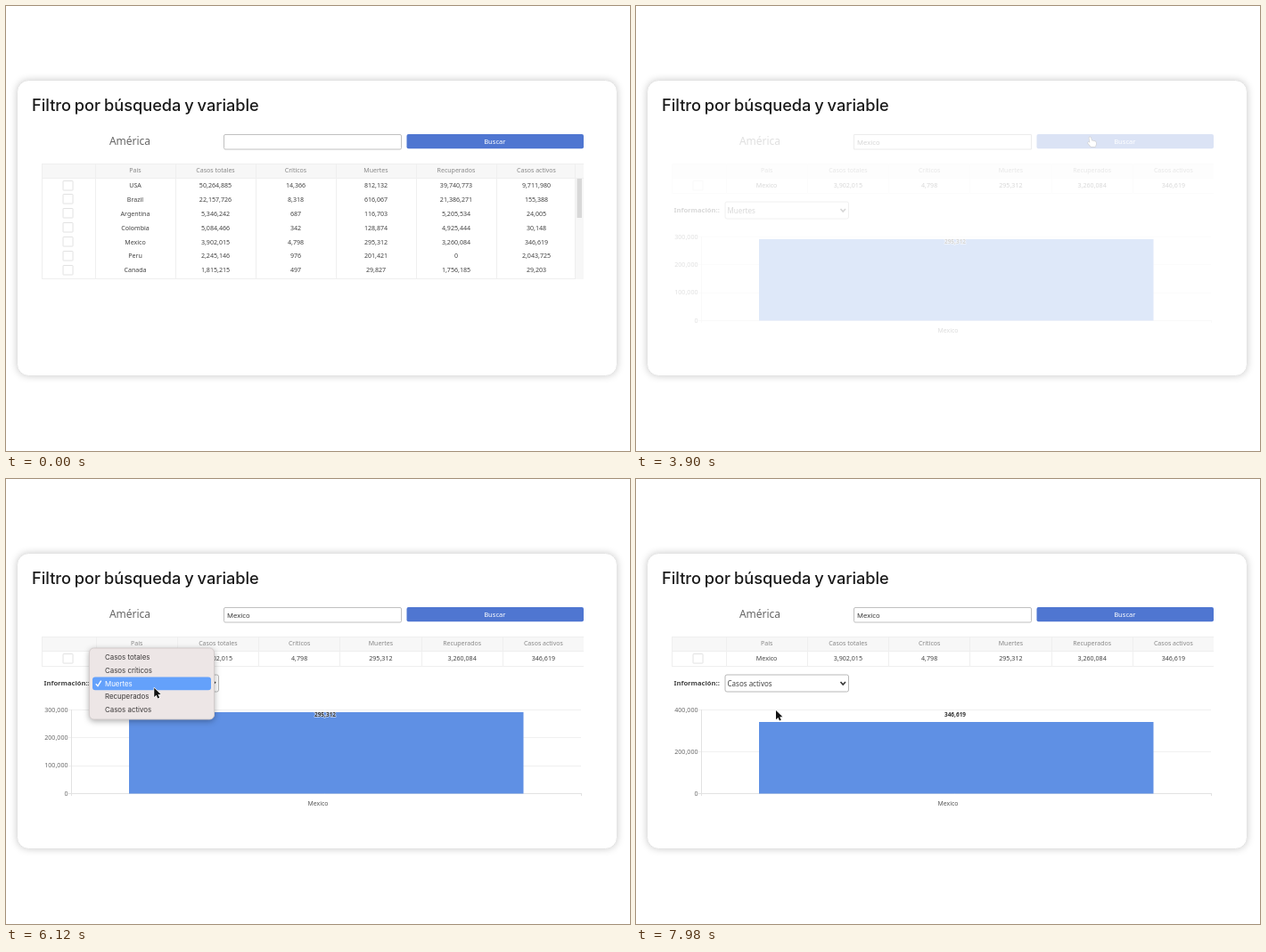
Animation of 700 by 500 pixels, one loop 8000 ms. Source, as an HTML page with a canvas:

```html
<!DOCTYPE html>
<html lang="es">
<head>
<meta charset="utf-8">
<title>Filtro por búsqueda y variable</title>
<style>
  html, body { margin: 0; width: 100%; height: 100%; overflow: hidden; background: #fff; }
  canvas { display: block; }
</style>
</head>
<body>
<canvas id="stage" width="700" height="500"></canvas>
<script>
const ctx = document.getElementById('stage').getContext('2d');
const LOOP = 8000;
const SWAP = 3840;        // table gives way to the search result
const MENU_OPEN = 6060;
const MENU_CLOSE = 7410;
const SANS = '"Noto Sans", sans-serif';
const UI = 'Inter, sans-serif';

const HEADERS = ['País', 'Casos totales', 'Críticos', 'Muertes', 'Recuperados', 'Casos activos'];
const COUNTRIES = `USA 50,264,885 14,366 812,132 39,740,773 9,711,980
Brazil 22,157,726 8,318 616,067 21,386,271 155,388
Argentina 5,346,242 687 116,703 5,205,534 24,005
Colombia 5,084,466 342 128,874 4,925,444 30,148
Mexico 3,902,015 4,798 295,312 3,260,084 346,619
Peru 2,245,146 976 201,421 0 2,043,725
Canada 1,815,215 497 29,827 1,756,185 29,203`.split('\n').map(row => row.split(' '));
const MEXICO = COUNTRIES.find(row => row[0] === 'Mexico');
const OPTIONS = ['Casos totales', 'Casos críticos', 'Muertes', 'Recuperados', 'Casos activos'];

const POINTER_START = { x: 632, y: 159 };
const MOVES = [
  { from: 30, to: 510, x: 289, y: 152 },
  { from: 2460, to: 2640, x: 325, y: 143 },
  { from: 2640, to: 3240, x: 511, y: 152 },
  { from: 4950, to: 5820, x: 167, y: 234 },
  { from: MENU_OPEN, to: 6690, x: 139, y: 265 },
  { from: 6930, to: 7170, x: 157, y: 260 }
];

const between = (v, a, b) => v >= a && v < b;
const clamp = v => Math.max(0, Math.min(1, v));
const progress = (t, a, b) => clamp((t - a) / (b - a));
const smooth = k => k * k * (3 - 2 * k);
const crisp = v => Math.floor(v) + 0.5;

function text(str, x, y, size, color, { align = 'center', weight = 500, family = SANS } = {}) {
  ctx.font = `${weight} ${size}px ${family}`;
  ctx.textAlign = align;
  ctx.fillStyle = color;
  ctx.fillText(str, x, y);
}

function box(x, y, w, h, r, fill, stroke) {
  ctx.beginPath();
  ctx.roundRect(x, y, w, h, r);
  ctx.fillStyle = fill;
  ctx.fill();
  if (!stroke) return;
  ctx.strokeStyle = stroke;
  ctx.lineWidth = 1;
  ctx.stroke();
}

function line(points, color, width = 1) {
  ctx.beginPath();
  points.forEach(([x, y]) => ctx.lineTo(x, y));
  ctx.strokeStyle = color;
  ctx.lineWidth = width;
  ctx.stroke();
}

function shadowBox(color, blur, offset, ...shape) {
  ctx.save();
  ctx.shadowColor = color;
  ctx.shadowBlur = blur;
  ctx.shadowOffsetY = offset;
  box(...shape);
  ctx.restore();
}

function drawCard() {
  ctx.fillStyle = '#fff';
  ctx.fillRect(0, 0, 700, 500);
  shadowBox('rgba(0,0,0,.22)', 8, 0, 12.5, 83.5, 673, 332, 13, '#fff');
  box(12.5, 83.5, 673, 332, 13, '#fff', '#e4e4e4');
  ctx.wordSpacing = '-1px';
  text('Filtro por búsqueda y variable', 29, 118, 18.2, '#1a1a1a', { align: 'left', family: UI });
  ctx.wordSpacing = '0px';
}

function caretVisible(t) {
  const phase = t < SWAP ? 960 : 320;
  return t < 1960 || (t - phase) % 1000 < 500;
}

function drawSearch(t) {
  text('América', 139, 156, 12, '#666');
  const focused = between(t, 690, MENU_OPEN);
  box(244.5, 144.5, 199, 16.5, focused ? 0 : 1.5, '#fff', focused ? '#a2a2a2' : '#c0c0c0');
  const typed = 'Mexico'.slice(0, Math.max(0, Math.floor((t - 1290) / 120)));
  text(typed, 248, 156, 7.7, '#333', { align: 'left' });
  if (focused && caretVisible(t)) {
    ctx.fillRect(248.3 + ctx.measureText(typed).width, 148, 0.9, 10);
  }
  box(449.5, 144, 198.5, 16.3, 2, '#4f76d1');
  text('Buscar', 548.3, 155, 7.6, '#fff');
}

// A narrow checkbox column, then one column per header.
function drawTable(rows, first, colWidth, bottom) {
  const rowHeight = 15.85;
  const edge = i => first + i * colWidth;
  const center = i => edge(i + 0.5);
  box(40, 177, 608, 16.5, 0, '#f7f7f7');
  for (const y of [177, 193, bottom]) line([[40, y + 0.5], [648, y + 0.5]], '#efefef');
  for (const x of [40, ...HEADERS.map((_, i) => edge(i))]) {
    line([[crisp(x), 177], [crisp(x), bottom]], '#efefef');
  }
  HEADERS.forEach((h, i) => text(h, center(i), 187.2, 7, '#888'));
  rows.forEach((row, r) => {
    const y = 201.5 + r * rowHeight;
    box(64, crisp(y - 5.5), 11, 10.5, 0.5, '#fff', '#e2e2e2');
    row.forEach((cell, i) => text(cell, center(i), y + 2.6, 7.1, '#444'));
  });
}

function drawFullTable() {
  drawTable(COUNTRIES, 100, 90, 306);
  box(639, 194, 9, 113, 0, '#f7f7f7');
  line([[638.5, 177], [638.5, 307]], '#efefef');
  box(640.5, 194, 5.5, 44, 0, '#d8d8d8');
}

function drawChart(label, max, ticks) {
  const base = 353.5, height = 94;
  const yOf = v => base - v / max * height;
  for (let i = 0; i <= ticks; i++) {
    const v = max * i / ticks, y = yOf(v);
    line([[70, crisp(y)], [645, crisp(y)]], i ? '#f0f0f0' : '#e2e2e2');
    text(v.toLocaleString('en-US'), 69.5, y + 2.2, 7.1, '#666', { align: 'right' });
  }
  for (const [x, top] of [[73.5, 259], [645.5, 353]]) line([[x, top], [x, 356]], '#e2e2e2');
  const top = yOf(Number(label.replace(',', ''))) + 1;
  box(138, top, 442.5, base - top, 0, '#5f90e4');
  ctx.font = `600 6.5px ${SANS}`;
  ctx.textAlign = 'center';
  ctx.strokeStyle = 'rgba(255,255,255,.65)';
  ctx.lineWidth = 1.3;
  ctx.strokeText(label, 358, 267.3);
  text(label, 358, 267.3, 6.5, '#333', { weight: 600 });
  text('Mexico', 350, 366.6, 6.9, '#555');
}

function drawResult(t) {
  drawTable([MEXICO], 101, 91.25, 210);
  text('Información::', 42.5, 232.4, 7.6, '#444', { align: 'left', weight: 700 });
  box(100, 220, 138.5, 19, 2, '#fff', '#b8b8b8');
  const choice = t < MENU_CLOSE ? 'Muertes' : 'Casos activos';
  text(choice, 102.5, 232.6, 8, '#444', { align: 'left' });
  line([[229.5, 228], [232.2, 231], [235, 228]], '#333', 1.6);
  if (t < 7500) drawChart(MEXICO[3], 300000, 3);
  else drawChart(MEXICO[5], 400000, 2);
}

function drawMenu(pointerY) {
  const itemHeight = 14.6;
  shadowBox('rgba(0,0,0,.35)', 7, 2, 93.5, 190, 140, 80, 5, '#ede6e6');
  box(93.5, 190, 140, 80, 5, '#ede6e6', '#d3cccc');
  const hovered = Math.floor((pointerY - 193.2) / itemHeight);
  OPTIONS.forEach((option, i) => {
    const y = 200.5 + i * itemHeight;
    const ink = i === hovered ? '#fff' : '#3a3737';
    if (i === hovered) box(97, y - 7.1, 133, itemHeight, 3, '#64a1fb');
    text(option, 111, y + 2.9, 7.9, ink, { align: 'left', weight: 400, family: UI });
    if (option === 'Muertes') line([[100.8, y + 0.5], [103, y + 3], [106.7, y - 3]], ink, 1.3);
  });
}

function pointerAt(t) {
  return MOVES.reduce((p, move) => {
    const k = smooth(progress(t, move.from, move.to));
    return { x: p.x + (move.x - p.x) * k, y: p.y + (move.y - p.y) * k };
  }, POINTER_START);
}

const ARROW = new Path2D('M0 0V10.2L2.4 8L4 11.6L5.8 10.8L4.2 7.3H7.4Z');
const HAND = new Path2D('M-2.6 -4.2Q-1.8 -5.4 -.9 -4.2L.1 -.8L3.4 -.1Q4.8 0 5 1.5V3.5L4.2 6H-.6L-4 2Q-4.2 .8 -2.6 1.2L-1.7 1.8Z');
const IBEAM = new Path2D('M-2.2 -5H2.2M0 -5V5M-2.2 5H2.2');

function drawPointer({ x, y }) {
  const onSearchRow = between(y, 142, 162);
  ctx.save();
  ctx.translate(x, y);
  ctx.lineJoin = 'round';
  if (onSearchRow && between(x, 244, 444)) {
    ctx.strokeStyle = '#222';
    ctx.lineWidth = 1.1;
    ctx.stroke(IBEAM);
  } else {
    const hand = onSearchRow && between(x, 449, 648);
    const shape = hand ? HAND : ARROW;
    ctx.strokeStyle = hand ? '#222' : '#fff';
    ctx.fillStyle = hand ? '#fff' : '#111';
    ctx.lineWidth = 1.3;
    ctx.stroke(shape);
    ctx.fill(shape);
  }
  ctx.restore();
}

function visibility(t) {
  if (t < SWAP) return 1 - progress(t, SWAP - 300, SWAP);
  if (t < 7380) return progress(t, SWAP, SWAP + 300);
  return t < 7500 ? 1 - progress(t, 7380, 7500) : progress(t, 7830, 7980);
}

function draw() {
  const t = performance.now() % LOOP;
  const pointer = pointerAt(t);
  drawCard();
  drawSearch(t);
  if (t < SWAP) drawFullTable();
  else drawResult(t);
  if (between(t, MENU_OPEN, MENU_CLOSE)) drawMenu(pointer.y);
  const typing = between(t, 1350, 2460);
  if (t >= 30 && !typing) drawPointer(pointer);
  ctx.fillStyle = `rgba(255,255,255,${1 - visibility(t)})`;
  ctx.fillRect(30, 130, 630, 255);
  requestAnimationFrame(draw);
}
requestAnimationFrame(draw);
</script>
</body>
</html>
```
